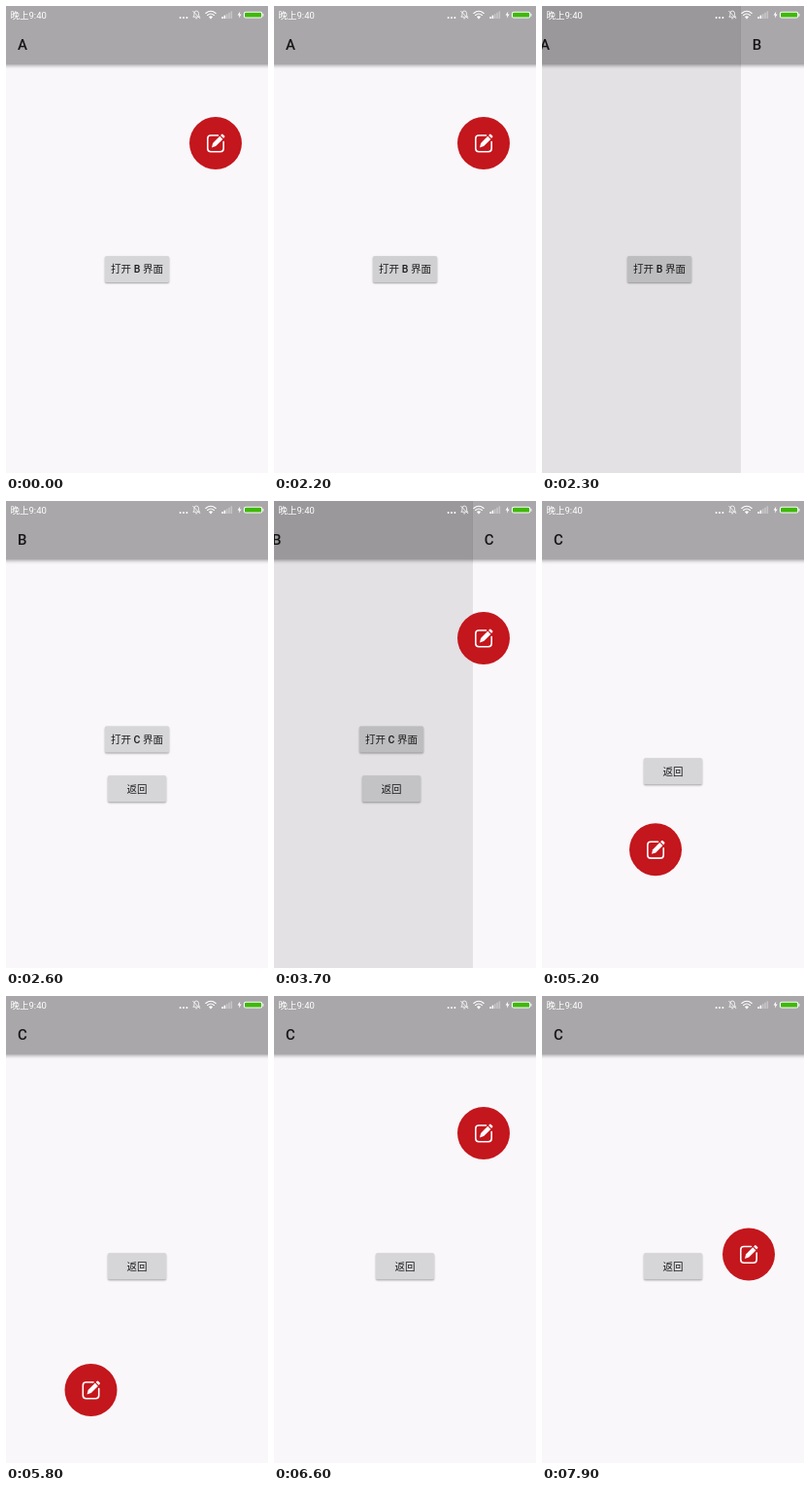
An HTML page with a canvas that plays this animation: 270 px wide and 480 px high, repeating every 8000 ms.

```html
<!DOCTYPE html>
<html lang="zh-CN">
<head>
<meta charset="utf-8">
<title>Floating button</title>
<style>
html, body { margin: 0; width: 100%; height: 100%; overflow: hidden; background: #f9f7fa; }
canvas { display: block; width: 270px; height: 480px; }
</style>
</head>
<body>
<canvas id="stage"></canvas>
<script>
const W = 270, H = 480, LOOP = 8000, STEP = 100;
const FONT = 'Roboto, "Noto Sans CJK SC", "Noto Sans CJK", sans-serif';
const canvas = document.getElementById('stage');
const ctx = canvas.getContext('2d');
const dpr = window.devicePixelRatio || 1;
canvas.width = W * dpr;
canvas.height = H * dpr;

const clamp = v => Math.min(1, Math.max(0, v));
const span = (t, from, to) => clamp((t - from) / (to - from));
const mix = (a, b, p) => a + (b - a) * p;
const easeOut = p => 1 - (1 - p) ** 3;
const easeInOut = p => (1 - Math.cos(Math.PI * p)) / 2;

const pages = {
  A: [{ label: '打开 B 界面', x: 102, y: 257, w: 66 }],
  B: [{ label: '打开 C 界面', x: 102, y: 231.5, w: 66 }, { label: '返回', x: 105, y: 282.3, w: 60 }],
  C: [{ label: '返回', x: 105, y: 264.3, w: 60 }]
};
const slides = [
  { at: 2200, from: 'A', to: 'B' },
  { at: 3600, from: 'B', to: 'C' }
];
const HOME = { x: 216, y: 141 }, LOW = { x: 87.5, y: 405 };

function text(str, x, y, size, color, weight = 400, align = 'left') {
  ctx.font = `${weight} ${size}px ${FONT}`;
  ctx.fillStyle = color;
  ctx.textAlign = align;
  ctx.fillText(str, x, y);
}

function box(x, y, w, h, r, color) {
  ctx.beginPath();
  ctx.roundRect(x, y, w, h, r);
  ctx.fillStyle = color;
  ctx.fill();
}

function dot(x, y, r, color) {
  ctx.beginPath();
  ctx.arc(x, y, r, 0, Math.PI * 2);
  ctx.fillStyle = color;
  ctx.fill();
}

function stroke(path, width, color = '#fff') {
  ctx.lineWidth = width;
  ctx.strokeStyle = color;
  ctx.stroke(new Path2D(path));
}

function fill(path, color = '#fff') {
  ctx.fillStyle = color;
  ctx.fill(new Path2D(path));
}

function shadow(blur, y, alpha) {
  ctx.shadowColor = `rgba(0,0,0,${alpha})`;
  ctx.shadowBlur = blur * dpr;
  ctx.shadowOffsetY = y * dpr;
}

function drawButton(b, pressed) {
  ctx.save();
  shadow(2, 0.9, 0.36);
  box(b.x, b.y, b.w, 27, 1.5, pressed ? '#d0cfd1' : '#d6d5d8');
  ctx.restore();
  text(b.label, b.x + b.w / 2, b.y + 17.4, 10.5, '#1d1c1d', 500, 'center');
}

function drawPage(name, x, pressed) {
  ctx.save();
  ctx.translate(x, 0);
  ctx.beginPath();
  ctx.rect(0, 0, W, H);
  ctx.clip();
  ctx.fillStyle = '#f9f7fa';
  ctx.fillRect(0, 0, W, H);
  ctx.save();
  shadow(4, 1, 0.4);
  ctx.fillStyle = '#a9a7a9';
  ctx.fillRect(-5, -5, W + 10, 65);
  ctx.restore();
  text(name, 12, 45.3, 15, '#171617', 500);
  pages[name].forEach((b, i) => drawButton(b, pressed && i === 0));
  ctx.restore();
}

function drawStatus() {
  text('晚上9:40', 4.5, 13, 9.5, '#fff');
  for (let i = 0; i < 3; i++) dot(179.6 + i * 3.4, 12, 1, '#fff');

  // muted bell
  stroke('M192.8 11.2H199.6L198.6 9.8V7.8Q198.4 5 196.2 5Q194 5 193.9 7.8V9.8ZM195.2 12.8H197.2M192.4 5L200.2 13', 0.8);

  // wifi
  ctx.lineCap = 'round';
  stroke('M205.8 7.5Q211 3 216.2 7.5M207.6 9.5Q211 6.6 214.4 9.5', 1.1);
  fill('M208.9 11Q211 9.4 213.1 11L211 13.4Z');
  ctx.lineCap = 'butt';

  // signal
  for (let i = 0; i < 5; i++) {
    const h = 2 + i * 1.4;
    ctx.fillStyle = i < 2 ? '#fff' : 'rgba(255,255,255,.35)';
    ctx.fillRect(222.3 + i * 2.3, 13 - h, 1.6, h);
  }

  fill('M241.3 5.6L238.6 9.6H240.4L239.9 12.6L242.6 8.5H240.8Z');
  box(245, 5.8, 19.2, 6.8, 2, '#fff');
  box(246, 6.8, 17.2, 4.8, 1.2, '#40b80c');
  ctx.fillStyle = '#fff';
  ctx.fillRect(264.4, 7.8, 1, 2.8);
}

function drawFab({ x, y }) {
  dot(x, y, 27, '#c4161d');
  ctx.save();
  ctx.translate(x, y);
  ctx.lineCap = 'round';
  stroke('M2.5 -8H-5Q-8.2 -8 -8.2 -4.8V5.6Q-8.2 8.8 -5 8.8H5Q8.2 8.8 8.2 5.6V-1.5', 1.6);
  fill('M-4 4.4L-2.9 0L4.3 -7.2L7.4 -4.1L0.2 3.1Z');
  fill('M5.1 -8L6.4 -9.2Q7 -9.6 7.6 -9.1L9.2 -7.5Q9.7 -6.9 9.2 -6.3L8.1 -4.9Z');
  ctx.restore();
}

function fabAt(t) {
  if (t < 4900) return HOME;
  if (t < 6260) {
    const p = span(t, 4860, 5760);
    return {
      x: mix(HOME.x, LOW.x, 1 - (1 - p) ** 3.1),
      y: mix(HOME.y, LOW.y, 1 - (1 - p) ** 3.65)
    };
  }
  if (t < 7500) {
    const p = easeInOut(span(t, 6260, 6560));
    return { x: mix(LOW.x, HOME.x, p), y: mix(LOW.y, HOME.y, p) };
  }
  const p = easeInOut(span(t, 7420, 7900));
  return { x: mix(HOME.x, 213, p), y: mix(HOME.y, 265.5, p) };
}

function drawScreen(t) {
  const slide = slides.find(s => t >= s.at && t < s.at + 400);
  if (slide) {
    const p = easeOut(span(t, slide.at + 73.6, slide.at + 373.6));
    drawPage(slide.from, -58 * p, t < slide.at + 200);
    if (p > 0) {
      ctx.fillStyle = `rgba(0,0,0,${0.37 * p})`;
      ctx.fillRect(0, 0, W, H);
      drawPage(slide.to, W * (1 - p));
    }
  } else {
    drawPage(t < 2200 ? 'A' : t < 3600 ? 'B' : 'C', 0);
  }
  drawStatus();
  if (t < 2300 || t >= 3700) drawFab(fabAt(t));
}

const start = performance.now();
function tick() {
  const t = Math.max(0, performance.now() - start) % LOOP;
  ctx.setTransform(dpr, 0, 0, dpr, 0, 0);
  drawScreen(Math.floor(t / STEP) * STEP);
  requestAnimationFrame(tick);
}
tick();
</script>
</body>
</html>
```
